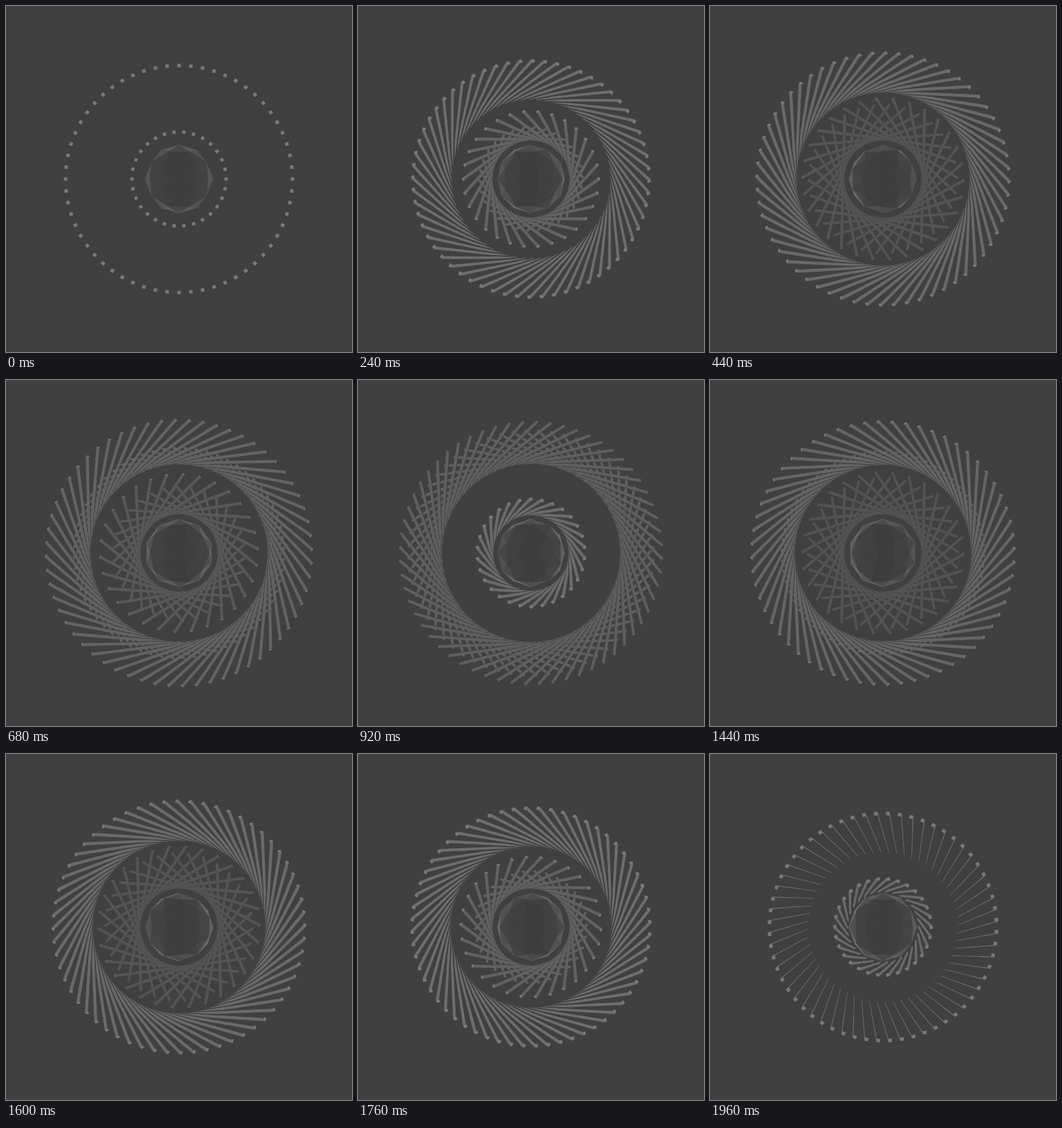
An HTML page with a canvas for the animation above (2000 ms loop, 500x500 px).

```html
<!DOCTYPE html>
<html>
<head>
<meta charset="utf-8">
<style>
  html, body { margin: 0; width: 100%; height: 100%; overflow: hidden; background: #404040; }
  canvas { display: block; }
</style>
</head>
<body>
<canvas id="stage" width="500" height="500"></canvas>
<script>
const ctx = document.getElementById('stage').getContext('2d');
const LOOP = 2000, STEP = 40, CAMERA = 633, HALF = 2, SLICES = 16, CORE = 49;
const RAD = Math.PI / 180;

const rings = [
  { count: 60, radius: 130, reach: 131, turns: 180, light: 112, fade: 18 },
  { count: 30, radius: 57.3, reach: 100, turns: -360, light: 110, fade: 28 }
];

// Slightly slow start, then catches up
const ease = p => p - 0.1 * p * (1 - p) ** 2;

function fill(points, grey) {
  ctx.fillStyle = ctx.strokeStyle = `rgb(${grey},${grey},${grey})`;
  ctx.beginPath();
  for (const [x, y] of points) ctx.lineTo(x, y);
  ctx.closePath();
  ctx.fill();
}

function project(theta, radial, tangent, z) {
  const k = CAMERA / (CAMERA - z), c = Math.cos(theta), s = Math.sin(theta);
  return [250 + k * (radial * c - tangent * s), 250 + k * (radial * s + tangent * c)];
}

function drawRing(ring, progress) {
  const turn = ring.turns * progress;
  const angle = (((turn + 90) % 180 + 180) % 180 - 90) * RAD;
  const sin = Math.sin(angle), cos = Math.cos(angle), v = Math.sign(angle) * HALF;
  const near = ring.radius - HALF, far = ring.radius + HALF, tip = ring.reach;
  const sideGrey = ring.light - ring.fade * sin * sin;

  // along: position on the rod, across: offset toward its visible side
  const at = (theta, radial, along, across) =>
    project(theta, radial, along * sin - across * cos, along * cos + across * sin);
  const eachRod = draw => {
    for (let i = 0; i < ring.count; i++) draw(i * 2 * Math.PI / ring.count);
  };

  // Slices run from the far end to the near end
  const length = 2 * tip / SLICES;
  for (let j = 0; j < SLICES; j++) {
    const a = -tip + j * length, b = Math.min(a + length + 0.8, tip);
    eachRod(theta => {
      fill([at(theta, near, a, v), at(theta, far, a, v), at(theta, far, b, v), at(theta, near, b, v)], sideGrey);
      fill([at(theta, near, a, -HALF), at(theta, near, a, HALF), at(theta, near, b, HALF), at(theta, near, b, -HALF)], 64);
    });
  }
  eachRod(theta =>
    fill([at(theta, near, tip, -HALF), at(theta, far, tip, -HALF), at(theta, far, tip, HALF), at(theta, near, tip, HALF)], 120));
}

const unit = v => v.map(c => c / Math.hypot(...v));
const sum = (...vs) => [0, 1, 2].map(i => vs.reduce((s, v) => s + v[i], 0));

// Icosahedron with every face split in four and pushed out to the sphere
function buildCore() {
  const phi = (1 + Math.sqrt(5)) / 2, corners = [], faces = [];
  for (const a of [-1, 1]) {
    for (const b of [-phi, phi]) corners.push([a, b, 0], [b, 0, a], [0, a, b]);
  }
  const joined = (p, q) => Math.abs(Math.hypot(...p.map((c, i) => c - q[i])) - 2) < 0.01;
  corners.forEach((p, i) => corners.slice(i + 1).forEach((q, j) =>
    corners.slice(i + j + 2).forEach(r => {
      if (!joined(p, q) || !joined(q, r) || !joined(p, r)) return;
      const [pq, qr, rp] = [sum(p, q), sum(q, r), sum(r, p)];
      for (const face of [[p, pq, rp], [q, qr, pq], [r, rp, qr], [pq, qr, rp]]) faces.push(face.map(unit));
    })));
  return faces;
}
const core = buildCore();

function drawCore(progress) {
  const sin = Math.sin(progress * Math.PI), cos = Math.cos(progress * Math.PI);
  ctx.lineWidth = 0.6;
  for (const face of core) {
    const turned = face.map(([x, y, z]) => [x * cos - z * sin, y, x * sin + z * cos]);
    const [nx, , nz] = unit(sum(...turned));
    if (nz <= 0) continue;
    const rim = Math.max(0, 0.65 - nz);
    fill(turned.map(([x, y]) => [250 + CORE * x, 250 + CORE * y]), 61 + 130 * rim * rim + 8 * Math.abs(nx));
    ctx.stroke();
  }
}

function frame() {
  const t = Math.floor(performance.now() % LOOP / STEP) * STEP;
  const progress = ease(t / LOOP);
  ctx.fillStyle = '#404040';
  ctx.fillRect(0, 0, 500, 500);
  for (const ring of rings) drawRing(ring, progress);
  drawCore(progress);
  requestAnimationFrame(frame);
}
frame();
</script>
</body>
</html>
```
